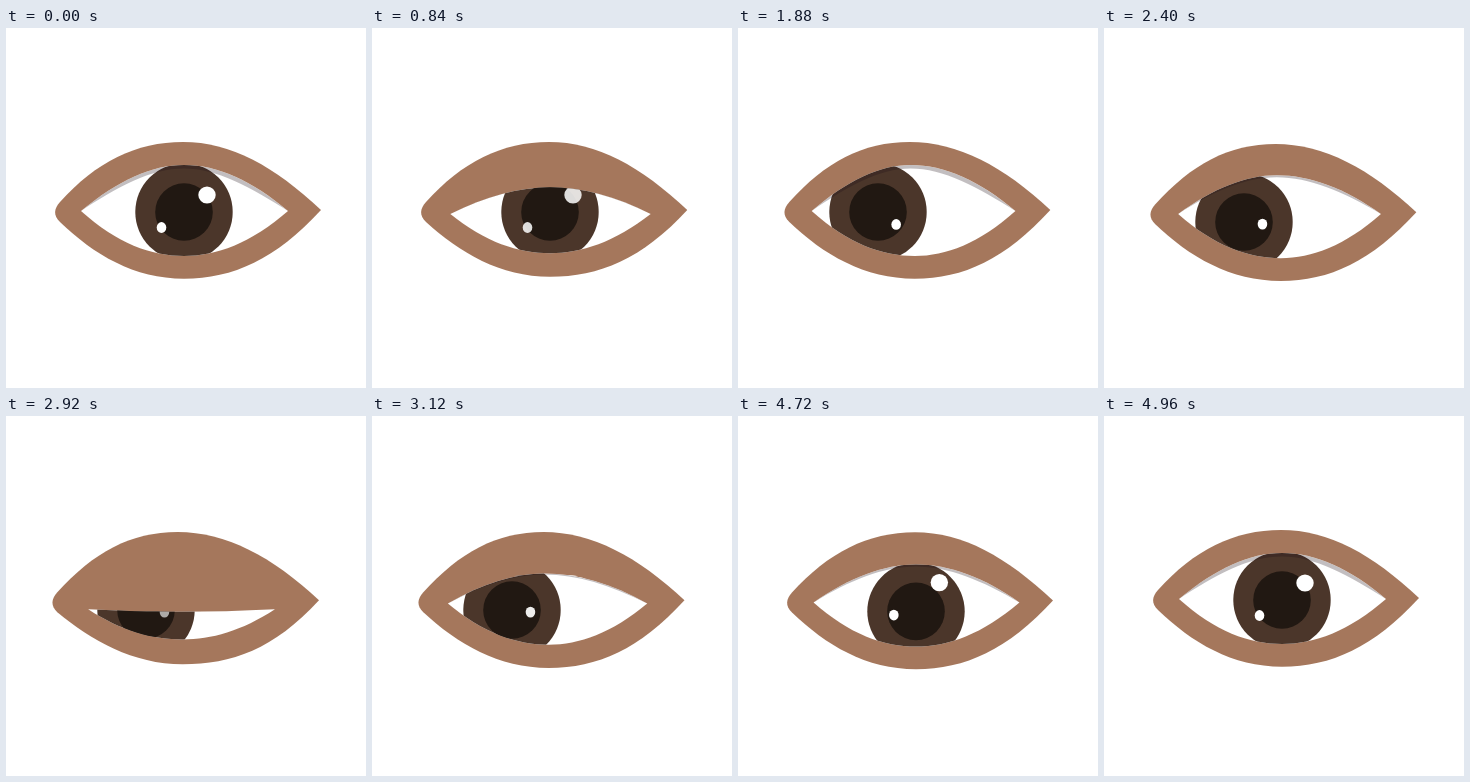
Write an HTML page with a canvas that moves like this. It is 360 px wide and 360 px high and loops after 5 s.

```html
<!DOCTYPE html>
<html lang="en">
<head>
<meta charset="utf-8">
<title>Eye</title>
<style>
  html, body { margin: 0; width: 100%; height: 100%; overflow: hidden; background: #fff; }
  canvas { display: block; width: 360px; height: 360px; }
</style>
</head>
<body>
<canvas id="stage"></canvas>
<script>
const LOOP = 5000, STEP = 40;
const SKIN = '#a5775c', IRIS = '#4b362a', PUPIL = '#211812';
const canvas = document.getElementById('stage');
const ctx = canvas.getContext('2d');
const scale = window.devicePixelRatio || 1;
canvas.width = canvas.height = 360 * scale;
ctx.scale(scale, scale);

// Progress from 0 to 1: quick start, long settling tail
const ease = (t, start, length) => {
  const u = Math.min(1, Math.max(0, (t - start) / length));
  return 1 - (1 - u) ** 4;
};

// Lid closure from 0 to 1: fast shut, slower opening
const blink = (t, start) => {
  const u = t - start;
  if (u <= 0 || u >= 400) return 0;
  return u < 120 ? u / 120 : (1 - (u - 120) / 280) ** 2.3;
};

function ellipse(x, y, rx, ry, color) {
  ctx.fillStyle = color;
  ctx.beginPath();
  ctx.ellipse(x, y, rx, ry, 0, 0, 2 * Math.PI);
  ctx.fill();
}

// Curve from one eye corner over an apex to the other; bulge sets its fullness
function arc(x0, x1, cornerY, apexX, apexY, bulge) {
  const y = cornerY + bulge * (apexY - cornerY);
  const a = apexX - x0, b = x1 - apexX;
  ctx.bezierCurveTo(x0 + 0.36 * a, y, apexX - 0.31 * a, apexY, apexX, apexY);
  ctx.bezierCurveTo(apexX + 0.32 * b, apexY, x1 - 0.35 * b, y, x1, cornerY);
}

function lens(x0, x1, cornerY, topX, top, bottomX, bottom, bottomBulge) {
  ctx.beginPath();
  ctx.moveTo(x0, cornerY);
  arc(x0, x1, cornerY, topX, top, 0.67);
  arc(x1, x0, cornerY, bottomX, bottom, bottomBulge);
  ctx.closePath();
}

function drawSkin(gx, gy, shut) {
  const dx = 0.07 * gx, dy = 0.23 * gy;
  const topX = 177 + 0.14 * gx, top = 114 + 0.2 * gy;
  const tipX = 315 + dx + shut, tipY = 182 + dy;
  const bottomX = 178 + dx / 2, bottom = 250.7 + dy - 7 * shut;
  const left = 54 + dx, y = 174 + dy;
  ctx.fillStyle = SKIN;
  ctx.beginPath();
  ctx.moveTo(left, y);
  ctx.bezierCurveTo(left + 36, y - 40, topX - 47, top, topX, top);
  ctx.bezierCurveTo(topX + 48, top, tipX - 47, tipY - 44, tipX, tipY);
  ctx.bezierCurveTo(tipX - 45, tipY + 49, bottomX + 49, bottom, bottomX, bottom);
  ctx.bezierCurveTo(bottomX - 50, bottom, left + 34, bottom - 24, left, y + 20);
  ctx.bezierCurveTo(left - 7, y + 13, left - 6, y + 7, left, y);
  ctx.fill();
}

function draw(t) {
  const goLeft = ease(t, 1320, 560), goDown = ease(t, 1880, 560);
  const goCentre = ease(t, 3560, 720), goBack = ease(t, 4680, 280);
  const gx = -38 * goLeft * (1 - goCentre);
  const gy = (10 * goDown + 11 * goCentre) * (1 - goBack);
  const shut = blink(t, 600) + blink(t, 2840);

  ctx.fillStyle = '#fff';
  ctx.fillRect(0, 0, 360, 360);
  drawSkin(gx, gy, shut);

  // Opening between the lids
  const dx = 0.07 * gx, pinch = 12 * shut + 0.05 * gy;
  const x0 = 75 + dx / 2 + pinch, x1 = 282 + 0.12 * gx - pinch;
  const cornerY = 183 + 0.3 * gy + 11 * shut;
  const bottom = 228 + 0.22 * gy - 10 * shut;
  const open = 137 + 1.02 * gy;
  const top = open + (218 + 0.22 * gy - open) * shut;
  const topX = 178 + 0.14 * gx, bottomX = 178 + dx / 2;

  if (shut < 0.99) {
    ctx.save();
    lens(x0, x1, cornerY, topX, top, bottomX, bottom, 0.72);
    ctx.clip();
    ctx.fillStyle = '#fff';
    ctx.fillRect(0, 0, 360, 360);
    ellipse(178 + gx, 184 + gy, 48.7, 48.7, IRIS);
    ellipse(178 + gx, 184 + gy, 28.8, 28.8, PUPIL);

    // Reflections stay almost still while the iris moves
    const hx = 0.03 * gy - dx, hy = 0.08 * gx - 0.04 * gy;
    const shine = `rgba(255,255,255,${1 - 0.55 * shut})`;
    ellipse(201 + hx, 167 + hy, 8.7, 8.6, shine);
    ellipse(155.5 + hx, 199.5 + hy, 4.8, 5.4, shine);

    // Shadow under the upper lid
    const depth = 3.5 * Math.max(0, 1 - 4 * shut) * (1 - gy / 25);
    ctx.fillStyle = 'rgba(30,16,22,.27)';
    lens(x0, x1, cornerY, topX, top, topX, top + depth, 0.67 - 0.03 * depth);
    ctx.fill();
    ctx.restore();
  }
}

function frame(now) {
  draw(Math.floor((now % LOOP) / STEP) * STEP);
  requestAnimationFrame(frame);
}
draw(0);
requestAnimationFrame(frame);
</script>
</body>
</html>
```
